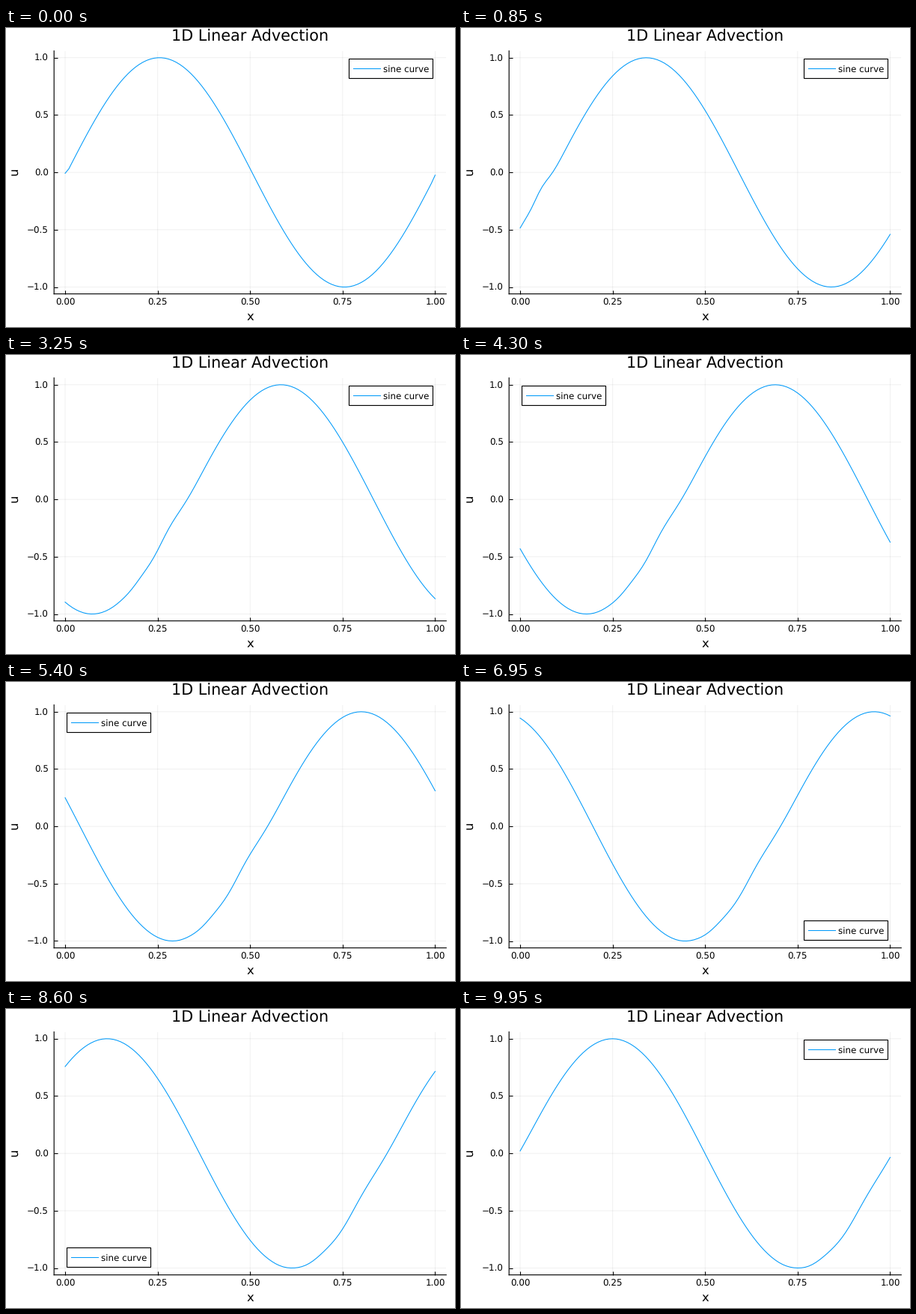
Animation, 600 px wide and 400 px high, one loop 10000 ms. Source, as a matplotlib script:

```python
import matplotlib.pyplot as plt
import numpy as np
from matplotlib.animation import FuncAnimation
from matplotlib.lines import Line2D
from matplotlib.patches import Rectangle
from matplotlib.transforms import Affine2D

W, H, DPI = 600, 400, 100
FRAMES, INTERVAL = 200, 50
POINTS = 101
COURANT = 0.005 * POINTS
PAD = 0.03
BLUE = "#009afa"
PT = 72 / DPI  # points per pixel

plt.rcParams["font.family"] = "DejaVu Sans"
plt.rcParams["text.hinting"] = "none"


def lax_wendroff(u, c):
    left, right = np.roll(u, 1), np.roll(u, -1)
    return u - c / 2 * (right - left) + c * c / 2 * (right - 2 * u + left)


def padded(v):
    margin = PAD * (v.max() - v.min())
    return v.min() - margin, v.max() + margin


def legend_offset(u):
    """Shift of the legend from the top right to the first empty corner."""
    fx = (x - XLIM[0]) / (XLIM[1] - XLIM[0])
    low, high = padded(u)
    fy = (u - low) / (high - low)
    corners = [
        (fx >= 0.75, fy >= 0.75, (0, 0)),
        (fx <= 0.25, fy >= 0.75, (-377, 0)),
        (fx >= 0.75, fy <= 0.25, (0, 278)),
        (fx <= 0.25, fy <= 0.25, (-377, 278)),
    ]
    return next((o for a, b, o in corners if not np.any(a & b)), (0, 0))


x = np.linspace(0, 1, POINTS)
XLIM = padded(x)

# The grid holds both end points, so the periodic wrap leaves a small kink.
states = []
wave = np.sin(2 * np.pi * x)
for _ in range(FRAMES):
    wave = lax_wendroff(wave, COURANT)
    states.append(wave)

fig = plt.figure(figsize=(W / DPI, H / DPI), dpi=DPI, facecolor="white")
L, R, T, B = 64.2, 588.3, 30.6, 355.7
ax = fig.add_axes([L / W, 1 - B / H, (R - L) / W, (B - T) / H])

# Pixel coordinates with the origin at the top left.
pixels = Affine2D().scale(1 / DPI, -1 / DPI).translate(0, H / DPI) + fig.dpi_scale_trans
shift = Affine2D()


def label(px, py, text, size, trans=pixels, **kw):
    return fig.text(px, py, text, fontsize=size * PT, transform=trans, **kw)


ax.set_xlim(*XLIM)
ax.set_xticks([0, 0.25, 0.5, 0.75, 1], labels=[])
ax.set_yticks([-1, -0.5, 0, 0.5, 1])
ax.yaxis.set_major_formatter("{x:.1f}")
ax.tick_params(direction="in", length=5 * PT, width=1.1 * PT, pad=7.3 * PT,
               labelsize=11.9 * PT)
ax.grid(color="black", alpha=0.06, linewidth=1 * PT)
ax.set_axisbelow(True)
ax.spines[["top", "right"]].set_visible(False)
ax.spines[["left", "bottom"]].set_linewidth(1.15 * PT)

# Keep fractional pixel positions for the axes.
for line in [*ax.get_xgridlines(), *ax.get_ygridlines(), *ax.get_xticklines(),
             *ax.get_yticklines(), *ax.spines.values()]:
    line.set_snap(False)

for tick in (0, 0.25, 0.5, 0.75, 1):
    label(79.1 + 494.4 * tick, 371, f"{tick:.2f}", 11.9, ha="center", va="baseline")
label(326.2, 18, "1D Linear Advection", 20.8, ha="center", va="baseline")
label(326.2, 391.4, "x", 16.35, ha="center", va="baseline")
label(11.5, 192.3, "u", 16.35, ha="center", va="center", rotation=90)

curve, = ax.plot([], [], color=BLUE, linewidth=1.05 * PT, solid_joinstyle="round")

# Legend, drawn at the top right and moved by shift.
movable = shift + pixels
fig.add_artist(Rectangle((458, 41), 112.3, 26.2, facecolor="white", edgecolor="black",
                         linewidth=1.15 * PT, transform=movable, zorder=5))
fig.add_artist(Line2D([464, 500], [54.2, 54.2], color=BLUE, linewidth=1.05 * PT,
                      transform=movable, zorder=6))
label(504.2, 59, "sine curve", 11.9, movable, ha="left", va="baseline", zorder=6)


def update(i):
    u = states[i]
    curve.set_data(x, u)
    ax.set_ylim(*padded(u))
    shift.clear().translate(*legend_offset(u))
    return [curve]


anim = FuncAnimation(fig, update, frames=FRAMES, interval=INTERVAL, repeat=True,
                     repeat_delay=0, blit=False)
plt.show()
```
